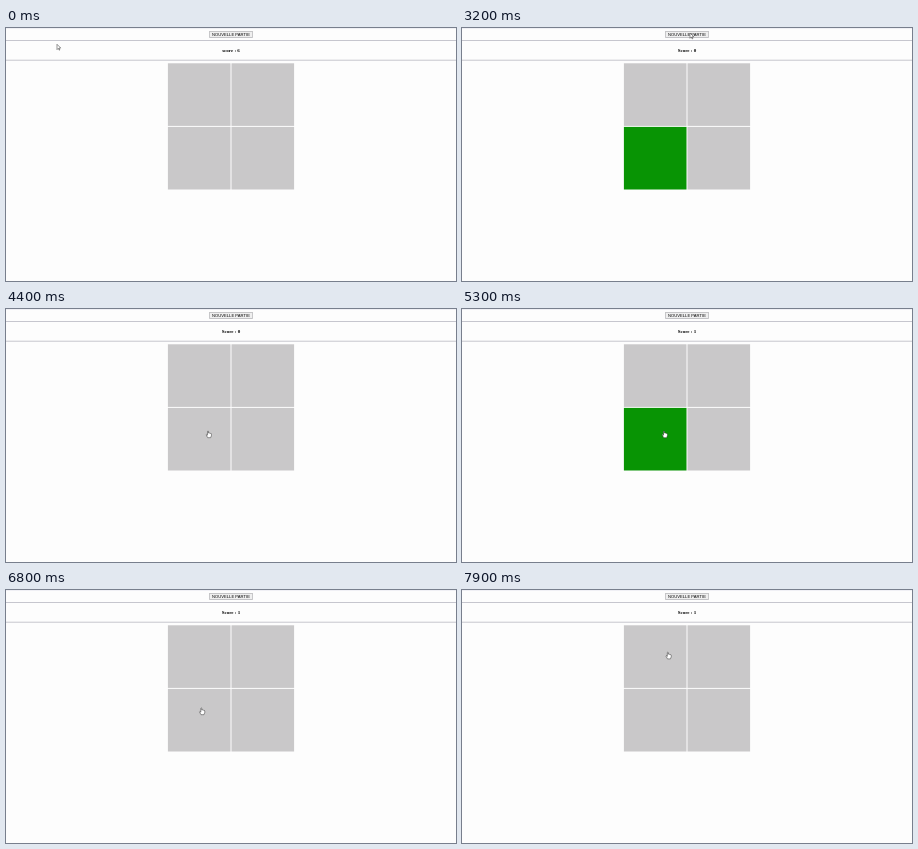
An HTML page with a canvas that plays this animation: 450 by 253 pixels, repeating every 8000 ms.

```html
<!DOCTYPE html>
<html lang="fr">
<head>
<meta charset="utf-8">
<title>Jeu de mémoire</title>
<style>
  html, body { margin: 0; width: 100%; height: 100%; overflow: hidden; background: #fdfdfd; }
  canvas { display: block; width: 450px; height: 253px; }
</style>
</head>
<body>
<canvas id="stage" width="450" height="253"></canvas>
<script>
const ctx = document.getElementById('stage').getContext('2d');
const LOOP = 8000, STEP = 100, ZOOM = 0.3125;
const CENTER = 225, PAD = 62.6, PITCH = 63.6, LEFT = 161.9, TOP = 35.3;
const GREY = '#c9c8c9', GREEN = '#089404', BLUE = '#0000f2';
const TOP_LEFT = 0, BOTTOM_LEFT = 2;

const firstStart = 2800, restart = 3700, goodGuess = 4600, secondGuess = 7300;

const start = { x: 51, y: 16.3 };
const moves = [
  { from: 0, to: 100, x: 57, y: 19 },
  { from: 900, to: 1600, x: 308, y: 114 },
  { from: 1700, to: 2030, x: 448, y: 73 },
  { from: 2100, to: 2770, x: 228, y: 5 },
  { from: 3200, to: 3500, x: 226, y: 9.5 },
  { from: restart, to: 4400, x: 202, y: 121.8 },
  { from: 5500, to: 6100, x: 196.7, y: 93.8 },
  { from: 6150, to: 6800, x: 195.3, y: 117.8 },
  { from: 7500, to: 7900, x: 205.8, y: 62 }
];

const flash = (pad, color, from, length) => ({ pad, color, from, to: from + length });

// The game shows its colours one after the other, 800 ms apart
const playback = (from, ...lights) =>
  lights.map(([pad, color], i) => flash(pad, color, from + 800 * i, 400));

const green = [BOTTOM_LEFT, GREEN], blue = [TOP_LEFT, BLUE];
const flashes = [
  ...playback(firstStart + 200, green),
  ...playback(restart + 300, green),
  flash(...green, goodGuess, 200),
  ...playback(goodGuess + 400, green, blue),
  flash(...green, secondGuess, 200)
];

const arrow = new Path2D('M0 0V17L4 13L7 19L9 18L6.5 12H12Z');
const hand = new Path2D('M-1.5 1.5Q0-1 1.5 1.5V7Q4 5.5 5 7.5Q7 6.5 8 8.5Q11 8 11 11V15L8.5 22H-1L-6 13Q-5 9-1.5 14Z');

const ease = u => u * u * (3 - 2 * u);
const mix = (a, b, k) => a + (b - a) * k;

function rect(x, y, w, h, color) {
  ctx.fillStyle = color;
  ctx.fillRect(x, y, w, h);
}

// Runs a drawing in full-size page units at the given stage point
function zoomed(x, y, paint) {
  ctx.save();
  ctx.translate(x, y);
  ctx.scale(ZOOM, ZOOM);
  paint();
  ctx.restore();
}

function label(text, y, font) {
  zoomed(CENTER, y, () => {
    ctx.font = font;
    ctx.fillStyle = '#000';
    ctx.fillText(text, 0, 0);
  });
}

function cursorAt(t) {
  let { x, y } = start;
  for (const m of moves) {
    if (t <= m.from) break;
    const k = ease(Math.min(1, (t - m.from) / (m.to - m.from)));
    x = mix(x, m.x, k);
    y = mix(y, m.y, k);
  }
  return { x, y };
}

function drawCursor({ x, y }) {
  const overPads = Math.abs(x - CENTER) < PITCH && y > TOP && y < TOP + 2 * PITCH;
  const shape = overPads ? hand : arrow;
  zoomed(x, y, () => {
    ctx.fillStyle = '#fff';
    ctx.fill(shape);
    ctx.lineWidth = 1.5;
    ctx.lineJoin = 'round';
    ctx.strokeStyle = '#222';
    ctx.stroke(shape);
  });
}

function drawHeader(t) {
  const pressed = t >= restart && t < restart + STEP;
  rect(0, 0, 450, 1, '#f0f0f5');
  rect(0, 12, 450, 1, '#c6c6ce');
  rect(0, 31.7, 450, 1, '#c6c6ce');
  rect(203.3, 3, 43.4, 6.8, pressed ? '#85858f' : '#a8a8ac');
  rect(203.9, 3.6, 42.2, 5.6, pressed ? '#e4e4e8' : '#efefef');
  label('NOUVELLE PARTIE', 7.9, '13.33px "Liberation Sans", Arial, sans-serif');

  const score = t < firstStart ? 'score : 6' : t < goodGuess ? 'Score : 0' : 'Score : 1';
  label(score, 23.9, 'bold 16px "Liberation Serif", Times, serif');
}

function drawPad(pad, t) {
  const x = LEFT + (pad % 2) * PITCH, y = TOP + (pad >> 1) * PITCH;
  const lit = flashes.find(f => f.pad === pad && t >= f.from && t < f.to);
  rect(x, y, PAD, PAD, lit ? lit.color : GREY);
}

function draw(t) {
  rect(0, 0, 450, 253, '#fdfdfd');
  drawHeader(t);
  for (let pad = 0; pad < 4; pad++) drawPad(pad, t);
  drawCursor(cursorAt(t));
}

function tick() {
  const t = performance.now() % LOOP;
  draw(Math.floor(t / STEP) * STEP);
  requestAnimationFrame(tick);
}

ctx.textAlign = 'center';
tick();
</script>
</body>
</html>
```
